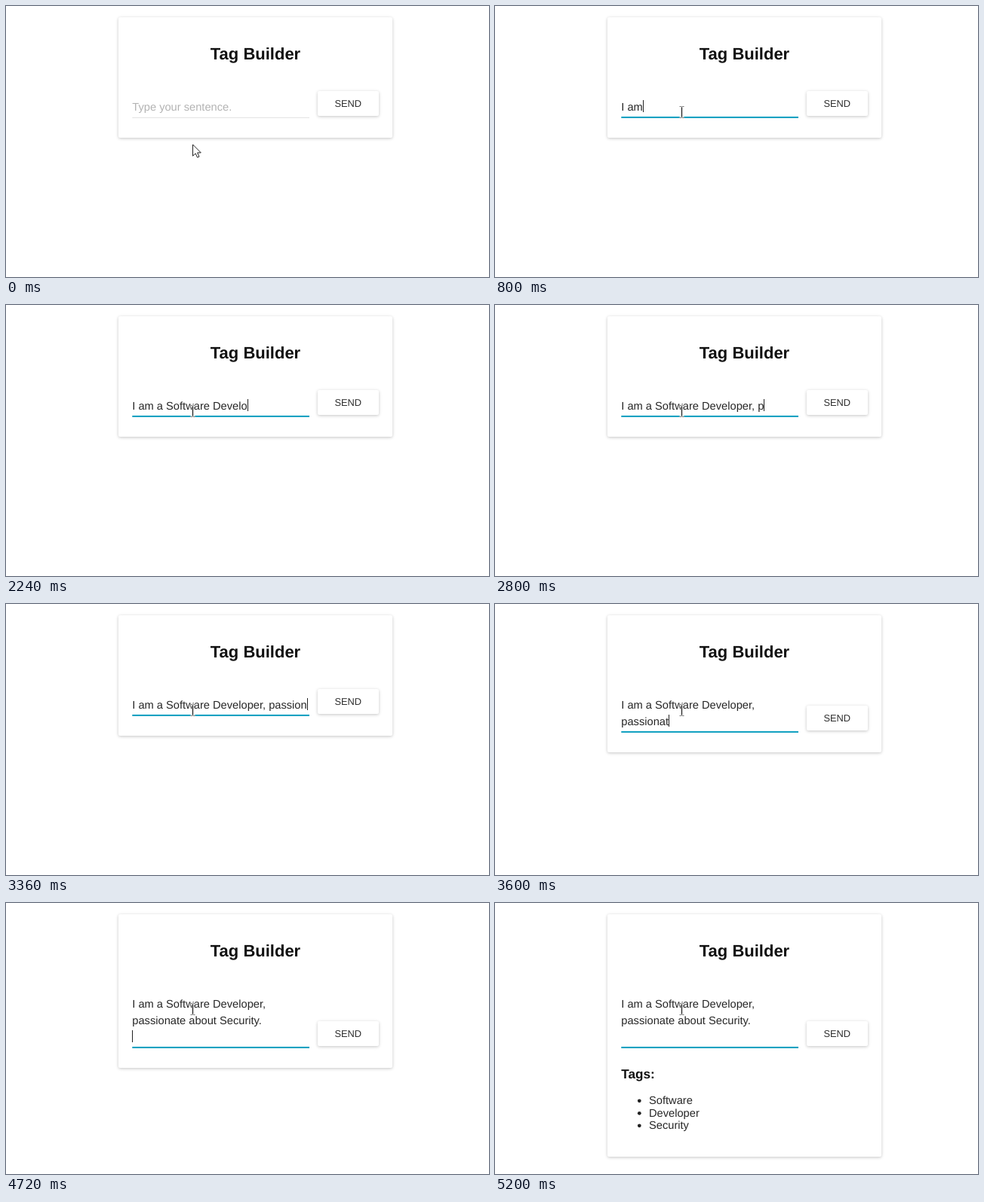
Recreate the animation shown at these times as an HTML page. Size 640 by 360 pixels, loop 5280 ms.

```html
<!DOCTYPE html>
<html lang="en">
<head>
<meta charset="utf-8">
<title>Tag Builder</title>
<style>
  html, body { margin: 0; width: 100%; height: 100%; overflow: hidden; background: #fff; }
  #stage { position: relative; width: 640px; height: 360px; overflow: hidden; background: #fff; }
  .paper {
    position: absolute; background: #fff; border-radius: 2px;
    box-shadow: 0 1px 5.5px rgba(0,0,0,.12), 0 1px 3.7px rgba(0,0,0,.12);
  }
  #card { left: 149px; top: 14.5px; width: 363px; }
  #button { left: 413px; width: 80.7px; height: 33px; }
  svg { position: absolute; left: 0; top: 0; }
  text {
    font: 14.667px "Liberation Sans", Arial, sans-serif;
    fill: rgba(0,0,0,.85); white-space: pre; text-rendering: geometricPrecision;
  }
  #title { font-size: 22px; font-weight: bold; fill: #111; }
  #send { font-size: 12.83px; fill: rgba(0,0,0,.82); }
  #hint { fill: rgba(0,0,0,.3); }
  #heading { font-size: 17.16px; font-weight: bold; fill: #111; }
</style>
</head>
<body>
<div id="stage">
  <div id="card" class="paper"></div>
  <div id="button" class="paper"></div>
  <svg width="640" height="360" viewBox="0 0 640 360">
    <text id="title" x="330.5" y="71.3" text-anchor="middle">Tag Builder</text>
    <g id="footer">
      <text id="send" x="453.3" y="134" text-anchor="middle">SEND</text>
      <rect x="167.3" y="147.8" width="234.7" height="1" fill="#e0e0e0"/>
      <rect id="ink" x="167.3" y="146.9" width="234.7" height="2" fill="#0c9fc0"/>
    </g>
    <text id="hint" x="167.3" y="138.5">Type your sentence.</text>
    <text id="line0" x="167.3" y="138.5"></text>
    <text id="line1" x="167.3" y="160.5"></text>
    <rect id="caret" width="1" height="16" fill="#222"/>
    <g id="tags">
      <text id="heading" x="167.3" y="233">Tags:</text>
    </g>
    <path id="arrow" d="M0 0V15.2L3.6 11.9L6.1 17.2L8.5 16.1L6.1 10.9H10.8Z"
      fill="#fff" stroke="#222" stroke-width="1" stroke-linejoin="round"/>
    <g id="beam" fill="none">
      <path d="M-3 -7.5H-1Q0 -7.5 0 -6.5Q0 -7.5 1 -7.5H3M0 -6.5V6.5M-3 7.5H-1Q0 7.5 0 6.5Q0 7.5 1 7.5H3" stroke="#fff" stroke-width="2.4"/>
      <path d="M-3 -7.5H-1Q0 -7.5 0 -6.5Q0 -7.5 1 -7.5H3M-3 7.5H-1Q0 7.5 0 6.5Q0 7.5 1 7.5H3" stroke="#777" stroke-width="1"/>
      <path d="M0 -6.5V6.5" stroke="#222" stroke-width="1.3"/>
    </g>
  </svg>
</div>
<script>
  const LOOP = 5280, STEP = 80;
  const CLICK = 400, ENTER = 4640, SEND = 4800, CARET_OFF = 5040;
  const LEFT = 167.3, LINE = 22, WRAP_AT = 27;
  const SENTENCE = "I am a Software Developer, passionate about Security.";
  // [time, characters typed]
  const TYPING = [[560, 0], [640, 1], [800, 4], [1520, 12], [2240, 22],
                  [3360, 34], [3920, 40], [4160, 46], [4560, 53]];
  const $ = id => document.getElementById(id);
  const clamp = v => Math.min(1, Math.max(0, v));
  const easeOut = v => 1 - (1 - clamp(v)) ** 4;
  const show = (id, on) => $(id).style.display = on ? "" : "none";
  const move = (id, x, y) => $(id).setAttribute("transform", `translate(${x} ${y})`);

  const svgNode = (name, attrs) => {
    const node = document.createElementNS("http://www.w3.org/2000/svg", name);
    for (const key in attrs) node.setAttribute(key, attrs[key]);
    return $("tags").appendChild(node);
  };
  ["Software", "Developer", "Security"].forEach((tag, i) => {
    const y = 267 + i * 16.5;
    svgNode("circle", { cx: 191.3, cy: y - 4.2, r: 2.4, fill: "#222" });
    svgNode("text", { x: 204, y }).textContent = tag;
  });

  function typedCount(t) {
    for (let i = 1; i < TYPING.length; i++) {
      const [t0, n0] = TYPING[i - 1], [t1, n1] = TYPING[i];
      if (t < t1) return Math.floor(n0 + (n1 - n0) * clamp((t - t0) / (t1 - t0)));
    }
    return SENTENCE.length;
  }

  function drawText(t) {
    const count = typedCount(t);
    const typed = SENTENCE.slice(0, count);
    const wrapped = count > 34;
    const lines = wrapped ? [typed.slice(0, WRAP_AT), typed.slice(WRAP_AT)] : [typed, ""];
    lines.forEach((s, i) => $("line" + i).textContent = s);

    const row = t >= ENTER ? 2 : wrapped ? 1 : 0;
    const width = row < 2 && lines[row] ? $("line" + row).getComputedTextLength() : 0;
    $("caret").setAttribute("x", Math.round(LEFT + width));
    $("caret").setAttribute("y", 125 + row * LINE);
    show("caret", t >= CLICK && t < CARET_OFF);
    show("hint", count === 0);
    return row;
  }

  function drawForm(t, row) {
    const drop = row * LINE, sent = t >= SEND;
    $("card").style.height = (sent ? 322 : 160 + drop) + "px";
    $("button").style.top = 113 + drop + "px";
    move("footer", 0, drop);
    show("tags", sent);
    const grow = easeOut((t - CLICK) / 450);
    $("ink").setAttribute("width", 234.7 * grow);
    $("ink").setAttribute("x", LEFT + 117.35 * (1 - grow));
  }

  function drawPointer(t) {
    const p = clamp((t - 40) / 280);
    const y = 184 - 43 * p * p * (3 - 2 * p);
    const inField = y < 150;
    show("arrow", !inField);
    show("beam", inField);
    move("arrow", 247.5, y);
    move("beam", 247.5, y);
  }

  function frame() {
    const t = Math.floor(performance.now() % LOOP / STEP) * STEP;
    drawForm(t, drawText(t));
    drawPointer(t);
    requestAnimationFrame(frame);
  }
  frame();
</script>
</body>
</html>
```
